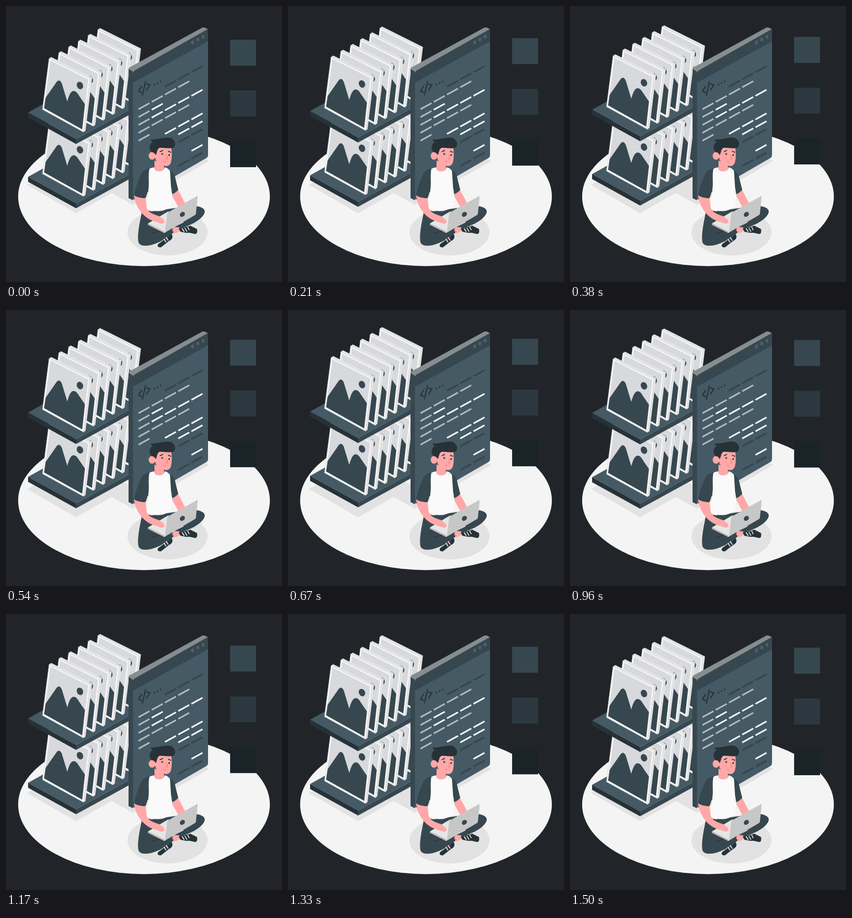
Recreate the animation shown at these times as an HTML page. Size 500x500 px, loop 1540 ms.

```html
<!DOCTYPE html>
<html lang="en">
<head>
<meta charset="utf-8">
<title>Front-end developer</title>
<style>
html, body { margin: 0; width: 100%; height: 100%; overflow: hidden; background: #212529; }
svg { display: block; width: 100vw; height: 100vh; }
.skin { fill: #ffa8a7; }
.dark { fill: #37474f; }
.ink { fill: #263238; }
.line { fill: none; stroke: #263238; }
</style>
</head>
<body>
<svg viewBox="0 0 500 500">
  <defs>
    <g id="picture">
      <path fill="#e4e4e4" d="M78 95L82 92.500L156 129.500L144 226L140.500 228.500L130 180Z"/>
      <path fill="#f7f7f7" stroke="#c6c8ca" stroke-width=".5" d="M78 95L152 131.500L140.500 228.500L66 187.500Z"/>
      <path fill="#d7d9dc" d="M80.500 98.800L149 133.200L138 223.500L69 185Z"/>
      <path class="dark" d="M71.800 166L90 140Q96 130 101 140L111 173Q116 154 122 154Q127 153 132 162L143 178L138 223.500L69 185Z"/>
      <ellipse class="dark" cx="134" cy="144" rx="5.600" ry="7" transform="rotate(-25 134 144)"/>
    </g>
    <g id="shelf">
      <path fill="#455a64" d="M40 193L137 139L240 179L127 241Z"/>
      <path class="ink" d="M40 193L127 241V250L40 202Z"/>
      <path class="dark" d="M127 241L240 179V188L127 250Z"/>
    </g>
  </defs>

  <ellipse cx="250" cy="345.200" rx="228" ry="126" fill="#f4f4f4"/>
  <g fill="#e2e2e2">
    <path d="M38 324L127 375.500L226 319L140 270Z"/>
    <path d="M190 338L230 360L368 281L330 258Z"/>
    <ellipse cx="292.500" cy="410" rx="72.500" ry="42"/>
  </g>

  <g id="rack" class="float"></g>

  <g id="window">
    <path fill="#858d91" d="M222 115Q222 112 225 110.500L355 39.500Q358 38 361 39.500L366 42L230 120Z"/>
    <path class="dark" d="M222 114L230 119V352L222 348Z"/>
    <path fill="#455a64" d="M230 122Q230 119 233 117L362 44Q366 42 366 46V270Q366 274 362 276L234 350Q230 352 230 348Z"/>
    <path class="dark" d="M230 122Q230 119 233 117L362 44Q366 42 366 46V64L230 139Z"/>
    <g id="dots" fill="#4b606a"></g>
    <path class="line" stroke-width="2" d="M246 145L240 154L246 157M253 136L247 162M254 141L260.500 143L254 153"/>
    <path class="line" stroke-width="2.600" stroke-dasharray="2.500 3.700" d="M268 143L284 135"/>
    <g id="code" fill="none" stroke-width="2.800"></g>
  </g>

  <g id="badges" class="float"></g>

  <g id="person">
    <path class="skin" d="M300 342L311 332L325 358L313 366Z"/>
    <path class="dark" d="M247 368L264 372L328 363C344 360 358 364 360 371C361 381 345 392 330 398L306 408C299 415 285 425 272 430C258 436 242 436 240 428C237 413 244 385 247 368Z"/>
    <path class="line" d="M264 412Q285 407 304 399"/>
    <path class="skin" d="M303 400L314 401L313 409L305 412L301 406Z"/>
    <path class="ink" d="M276 431L290 421L300 413C304 419 300 424 295 426L281 437C276 438 273 435 276 431ZM313 404L334 398L346 404C347 409 346 413 343 413C338 413 334 410 327 411L316 409Z"/>
    <path fill="none" stroke="#f5f5f5" stroke-width="1.500" d="M286 422L290 428M290 419L294 425M319 403L323 409M324 402L328 409M329 400L332 406"/>
    <path fill="#fafafa" d="M257 299C258 294 264 293 270 292C275 301 284 300 288 292C294 294 299 299 300 306C303 324 302 345 299 360C294 370 280 373 268 371C258 369 252 366 251 364C255 350 260 345 257 325Z"/>
    <path class="dark" d="M260 294C250 296 246 301 243 309C238 320 234 332 232 343Q241 349 253 348L258 332C260 320 257 306 260 294ZM297 298C304 301 306 306 307 313L312 333Q308 338 301 341L299 328Z"/>
    <path class="skin" d="M269 280L269 296C272 301 284 301 287 295L285 286Z"/>
    <path class="skin" d="M268 257L299 254C301 267 301 281 297 287C293 292 283 290 276 285C270 281 268 268 268 257Z"/>
    <ellipse class="skin" cx="264.500" cy="271.500" rx="6" ry="7"/>
    <path class="ink" d="M265 265C258 262 259 250 266 246C263 245 262 243 262 241.500C271 243 277 240 286 239C295 237 303 240 303 243C308 246 307 254 303 257C293 259 283 256 278 257C273 259 274 267 271 270C269 266 267 265 265 265Z"/>
    <g class="ink"><circle cx="283" cy="268" r="1.600"/><circle cx="295.500" cy="270" r="1.600"/></g>
    <path class="line" stroke-width="1.400" stroke-linecap="round" d="M279 264L284 261.500M294 263L298.500 265"/>
    <path fill="none" stroke="#e27876" d="M291 270L293.500 277L290 277.500M284 281.500Q286 283 289 282"/>

    <path fill="#e6e6e6" d="M257 394L294 372L322 392L287 409Z"/>
    <path fill="#c0c0c0" d="M257 394L287 409V411.500L257 396.500Z"/>
    <path fill="#c7c7c7" d="M291.500 375L345 345Q347.500 343.500 347.300 346L344 376Q343.800 378 342 379L287 411Z"/>
    <path fill="none" stroke="#e6e6e6" stroke-width="1.500" d="M291.500 375L287 410.500"/>
    <ellipse class="dark" cx="319.500" cy="377.500" rx="5" ry="4" transform="rotate(-40 319.500 377.500)"/>
    <path class="skin" d="M232 343Q241 349 253 348L255 366C258 374 268 378 276 380C284 385 289 389 287 392C284 396 279 394 275 392C264 390 252 383 245 374C238 365 233 354 232 343Z"/>
  </g>
</svg>
<script>
const LOOP = 1540, STEPS = 37, RISE = 10, PERIOD = 1500, LEAD = 25;
const SLOPE = 0.55;
const NS = "http://www.w3.org/2000/svg";

function add(parent, tag, attrs) {
  const el = document.createElementNS(NS, tag);
  for (const key in attrs) el.setAttribute(key, attrs[key]);
  document.getElementById(parent).append(el);
}

function place(id, x, y) {
  add("rack", "use", { href: "#" + id, transform: `translate(${x} ${y})` });
}

// Lower level first, pictures from back to front
for (const level of [116.5, 0]) {
  place("shelf", 0, level);
  for (let i = 5; i >= 0; i--) place("picture", i * 17.7, level - i * 10.5);
}

// Code on an isometric grid: one word per row, one letter per column
const ink = { d: "#34444c", g: "#b4bcc0", w: "#fafafa" };
const rows = "--ddd gggg- gw--- gwwww gggg- g---- --www ---ww ---dd ----- ----w ---dd";
rows.split(" ").forEach((row, r) => [...row].forEach((letter, c) => {
  if (!ink[letter]) return;
  const x = 24 * c, y = 172.700 + 14.250 * r - SLOPE * x;
  add("code", "path", { stroke: ink[letter], d: `M${240 + x} ${y}l20 ${-20 * SLOPE}` });
}));

for (let i = 0; i < 3; i++) {
  add("dots", "ellipse", { cx: 338 + 9.5 * i, cy: 66 - 5.3 * i, rx: 2.6, ry: 3.5 });
}

["#37474f", "#2b383f", "#1a2428"].forEach((fill, i) =>
  add("badges", "rect", { x: 406, y: 61 + i * 92, width: 47, height: 47, fill }));

const floats = document.querySelectorAll(".float");
const lift = t => RISE * (1 - Math.abs(1 - 2 * (((t + LEAD) / PERIOD) % 1)));

function draw(now) {
  const step = Math.floor((now % LOOP) * STEPS / LOOP + 0.1) % STEPS;
  const y = lift(0) - lift(step * LOOP / STEPS);
  floats.forEach(g => g.setAttribute("transform", `translate(0 ${y.toFixed(2)})`));
}

const start = performance.now();
function tick() {
  draw(performance.now() - start);
  requestAnimationFrame(tick);
}
tick();
</script>
</body>
</html>
```
